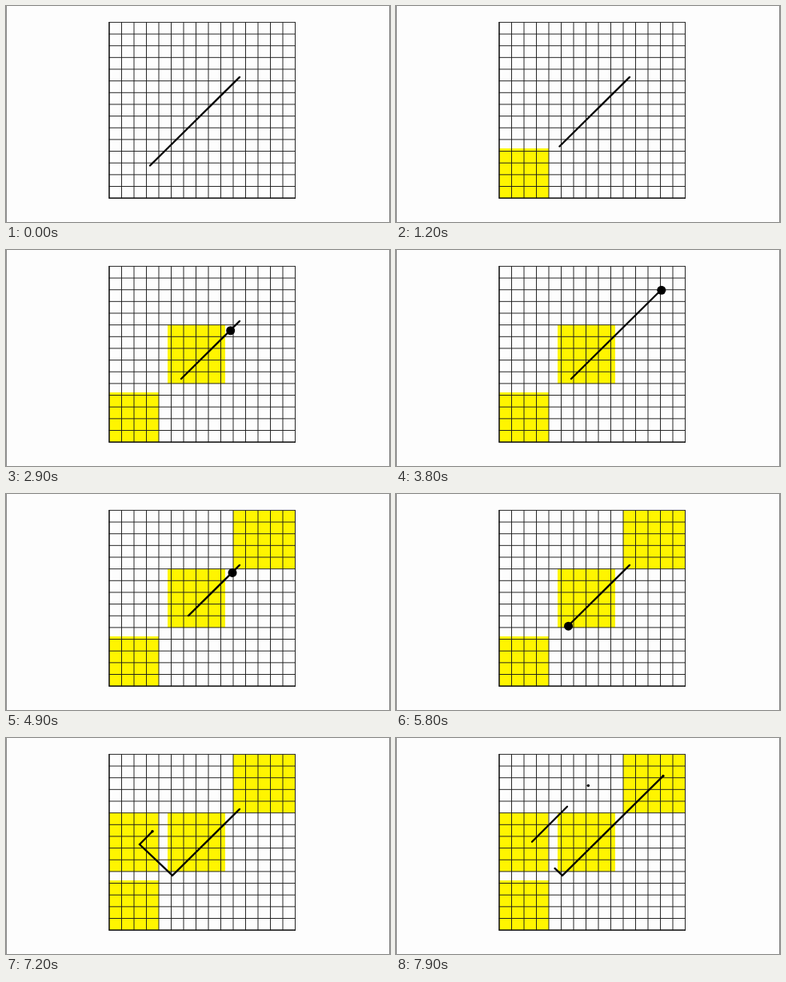
Recreate the animation shown at these times as an HTML page. Size 480 px wide and 270 px high, loop 8000 ms.

```html
<!DOCTYPE html>
<html lang="en">
<head>
<meta charset="utf-8">
<title>Grid path</title>
<style>
  html, body { margin: 0; width: 100%; height: 100%; overflow: hidden; background: #fdfdfd; }
  svg { display: block; width: 100vw; height: 100vh; }
  .area { fill: #fff500; animation: 8s step-end infinite; }
  .low { animation-name: low; }
  .mid { animation-name: mid; }
  .top { animation-name: top; }
  .left { animation-name: left; }
  @keyframes low { 0% { opacity: 0; } 8.75%, 100% { opacity: 1; } }
  @keyframes mid { 0% { opacity: 0; } 35%, 100% { opacity: 1; } }
  @keyframes top { 0% { opacity: 0; } 48.75%, 100% { opacity: 1; } }
  @keyframes left { 0% { opacity: 0; } 80%, 100% { opacity: 1; } }
  #grid { fill: none; stroke: #1c1c1c; stroke-width: 0.95; }
  .axis { fill: none; stroke: #111; stroke-width: 1.2; }
  #path { fill: none; stroke: #000; stroke-width: 2.3; stroke-linecap: round; stroke-linejoin: miter; }
</style>
</head>
<body>
<svg viewBox="0 0 480 270">
  <rect width="480" height="270" fill="#fdfdfd"/>
  <path d="M.5 0V270M479.5 0V270" stroke="#888"/>
  <rect class="area low" x="129" y="178" width="62" height="62"/>
  <rect class="area mid" x="202" y="93.5" width="72" height="73.5"/>
  <rect class="area top" x="284" y="20.5" width="77.5" height="73"/>
  <rect class="area left" x="129" y="93.5" width="61.5" height="73.5"/>
  <path id="grid"/>
  <path class="axis" d="M129 20V240.1H362"/>
  <path id="path"/>
  <circle id="ball" r="5.5"/>
  <circle id="dot" r="1.8"/>
  <circle id="tip" r="1.6"/>
</svg>
<script>
const $ = id => document.getElementById(id);
const LOOP = 8000, STEP = 100, CELLS = 15;

let lines = '';
for (let i = 0; i <= CELLS; i++) {
  const x = 129 + i * 15.5;
  const y = 20.4 + i * 14.65;
  lines += `M${x} 20V240.4M128.7 ${y}H362`;
}
$('grid').setAttribute('d', lines);

// Linear ramp from a to b between times t0 and t1, held outside.
const ramp = (t, t0, t1, a, b) =>
  a + (b - a) * Math.min(1, Math.max(0, (t - t0) / (t1 - t0)));

const main = x => [x, 161 - (x - 219) * 0.988];   // long diagonal
const side = x => [x, 299.8 - x];                 // short diagonal on the left
const link = x => [x, 133 + (x - 167) * 0.95];
const poly = points => 'M' + points.map(p => p.join(' ')).join('L');

function place(id, point, dy = 0) {
  const el = $(id);
  el.style.display = point ? '' : 'none';
  if (point) {
    el.setAttribute('cx', point[0]);
    el.setAttribute('cy', point[1] + dy);
  }
}

function ballX(t) {
  if (t < 1800 || t >= 6100) return null;
  return t < 4200 ? ramp(t, 1800, 3800, 218.2, 331.8)
                  : ramp(t, 4250, 5900, 331.8, 208);
}

function draw(t) {
  const ball = ballX(t);
  let low = t < 4300 ? ramp(t, 700, 1500, 180, 219) : 228;
  let high = ramp(t, 7200, 7900, 292, 334);
  if (ball !== null) {
    low = Math.min(low, ball);
    high = Math.max(high, ball);
  }
  if (t >= 5900) low = 208;

  const route = [main(high), main(low)];
  let d, dot = null;

  if (t <= 6500) {
    d = poly(route);
  } else if (t <= 7000) {
    dot = link(ramp(t, 6500, 7000, 208, 167));
    d = poly([...route, dot]);
  } else if (t <= 7200) {
    dot = side(ramp(t, 7000, 7200, 167, 183));
    d = poly([...route, link(167), dot]);
  } else {
    const move = (a, b) => ramp(t, 7200, 7900, a, b);
    dot = side(move(183, 240.3));
    d = poly([...route, link(move(167, 198.5))]) +
        poly([side(move(167, 170)), side(move(183, 214))]);
  }

  $('path').setAttribute('d', d);
  place('ball', ball === null ? null : main(ball), 0.7);
  place('dot', dot);
  place('tip', t > 7200 ? main(high) : null);
}

function tick() {
  const t = performance.now() % LOOP;
  draw(Math.floor(t / STEP) * STEP);
  requestAnimationFrame(tick);
}
tick();
</script>
</body>
</html>
```
